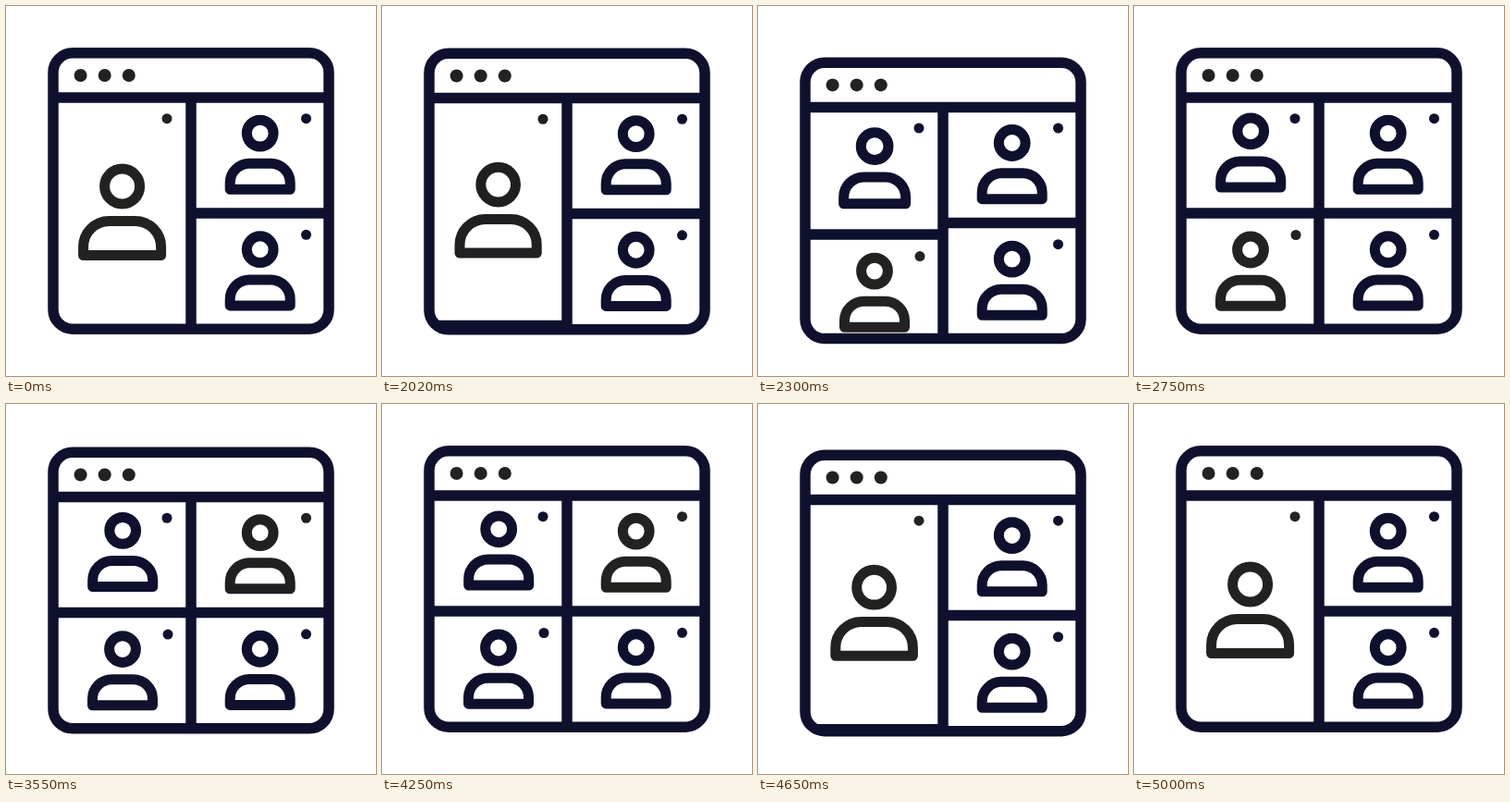
Animation, 400 px wide and 400 px high, one loop 5020 ms. Source, as an HTML page with a canvas:

```html
<!DOCTYPE html>
<html lang="en">
<head>
<meta charset="utf-8">
<title>Video call layout</title>
<style>
  html, body { margin: 0; width: 100%; height: 100%; overflow: hidden; background: #fff; }
  canvas { display: block; width: 100vmin; height: 100vmin; }
</style>
</head>
<body>
<canvas id="stage" width="400" height="400"></canvas>
<script>
const ctx = document.getElementById('stage').getContext('2d');
const LOOP = 5020, STEP = 25;
const SPLIT = 2000, SWAP = 3325, MERGE = 4250;
const NAVY = [15, 16, 46], DARK = [34, 34, 33];

const clamp = x => Math.min(1, Math.max(0, x));
const lerp = (a, b, k) => a + (b - a) * k;
const ramp = (t, start, dur) => clamp((t - start) / dur);
const tint = k => `rgb(${NAVY.map((c, i) => Math.round(lerp(c, DARK[i], k)))})`;

function bezier(x1, y1, x2, y2) {
  const at = (a, b, s) => 3 * a * s * (1 - s) ** 2 + 3 * b * s * s * (1 - s) + s ** 3;
  return x => {
    if (x <= 0 || x >= 1) return clamp(x);
    let lo = 0, hi = 1;
    for (let i = 0; i < 24; i++) {
      const mid = (lo + hi) / 2;
      if (at(x1, x2, mid) < x) lo = mid; else hi = mid;
    }
    return at(y1, y2, lo);
  };
}
const glide = bezier(0.2, 0.08, 0.2, 1);
const settle = bezier(0.35, 0, 0.13, 1);

// Quick dip, then a long return to rest
function dip(t, start, dur, height) {
  const x = ramp(t, start, dur);
  return height * (x < 0.25 ? (1 - Math.cos(4 * Math.PI * x)) / 2 : 1 - settle((x - 0.25) / 0.75));
}

function line(x1, y1, x2, y2) {
  ctx.beginPath();
  ctx.moveTo(x1, y1);
  ctx.lineTo(x2, y2);
  ctx.stroke();
}

function dot(x, y, r, color) {
  ctx.fillStyle = color;
  ctx.beginPath();
  ctx.arc(x, y, r, 0, 2 * Math.PI);
  ctx.fill();
}

// size runs from 0 (small tile) to 1 (tall tile)
function person(x, y, color, size = 0) {
  const half = lerp(32.5, 42, size), radius = lerp(21, 28, size);
  const top = y + lerp(32.7, 37.5, size), bottom = y + lerp(60.7, 74.5, size);
  ctx.strokeStyle = color;
  ctx.lineWidth = 11;
  ctx.beginPath();
  ctx.arc(x, y, lerp(14.4, 19, size), 0, 2 * Math.PI);
  ctx.stroke();
  ctx.beginPath();
  ctx.moveTo(x - half, bottom);
  ctx.arcTo(x - half, top, x, top, radius);
  ctx.arcTo(x + half, top, x + half, bottom, radius);
  ctx.lineTo(x + half, bottom);
  ctx.closePath();
  ctx.stroke();
}

function frameLines() {
  ctx.strokeStyle = tint(0);
  ctx.lineWidth = 11.5;
}

function windowPath() {
  ctx.beginPath();
  ctx.roundRect(51, 50.8, 298, 298.4, 21);
}

function draw(t) {
  const split = glide(ramp(t, SPLIT, 500)) - glide(ramp(t, MERGE, 500));
  const swap = ramp(t, SWAP, 250), back = ramp(t, MERGE, 250);
  const topLeft = tint(1 - ramp(t, SPLIT, 250) + back);
  const topRight = tint(swap - back);
  const bottomLeft = tint(1 - swap);
  const navy = tint(0), dark = tint(1);
  const shift = dip(t, SPLIT, 750, 13) + dip(t, SWAP, 475, 3) + dip(t, MERGE, 750, 13);

  ctx.fillStyle = '#fff';
  ctx.fillRect(0, 0, 400, 400);
  ctx.save();
  ctx.translate(0, shift);
  ctx.lineJoin = 'round';

  // Lower left tile slides up from the window's bottom edge
  ctx.save();
  windowPath();
  ctx.clip();
  const drop = 126 * (1 - split);
  frameLines();
  line(51, 224 + drop, 200, 224 + drop);
  person(126, 263.5 + drop, bottomLeft);
  if (t < 2950 || t >= 3100) dot(175, 247.5 + drop, 5.5, bottomLeft);
  ctx.restore();

  person(lerp(125.6, 126.2, split), lerp(195, 135.3, split), topLeft, 1 - split);
  dot(174, 121.7, 5.5, topLeft);
  person(274.7, 137.6, topRight);
  if (t < 3925 || t >= 4100) dot(324.5, 121.7, 5.5, topRight);
  person(274.7, 263.2, navy);
  dot(324.5, 247.3, 5.5, navy);

  frameLines();
  windowPath();
  ctx.stroke();
  line(51, 99, 349, 99);
  line(200, 99, 200, 349);
  line(200, 224, 349, 224);
  for (let i = 0; i < 3; i++) dot(80.6 + 26.1 * i, 75, 7, dark);
  ctx.restore();
}

function tick() {
  const t = performance.now() % LOOP;
  draw(Math.floor((t + 5) / STEP) * STEP);
  requestAnimationFrame(tick);
}
tick();
</script>
</body>
</html>
```
